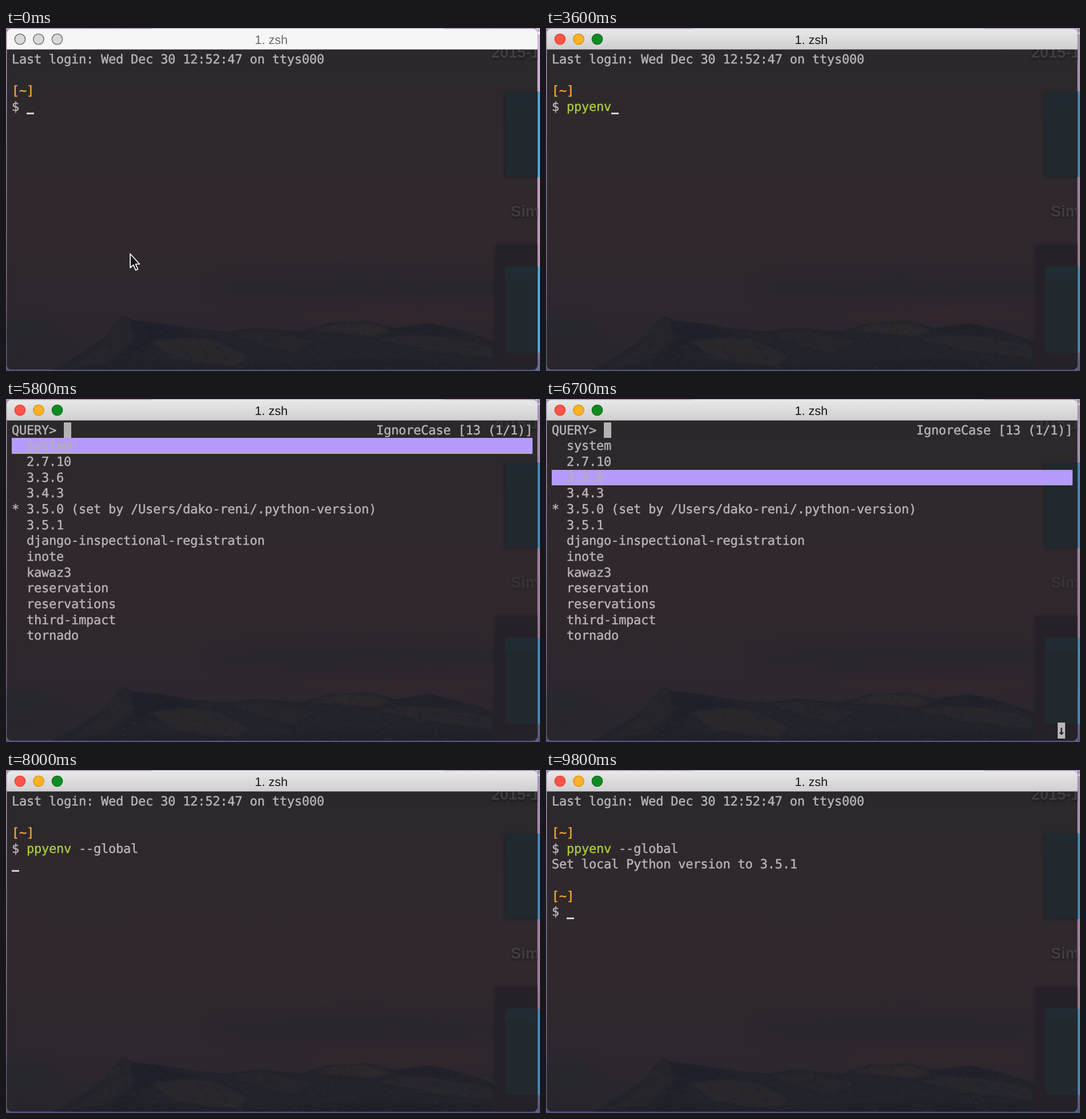
Animation, 933 px wide and 600 px high, one loop 9900 ms. Source, as an HTML page:

```html
<!DOCTYPE html>
<html lang="en">
<head>
<meta charset="utf-8">
<title>zsh</title>
<style>
html, body { margin: 0; width: 100%; height: 100%; overflow: hidden; background: #8f7a9c; }
svg { display: block; width: 933px; height: 600px; }
filter { color-interpolation-filters: sRGB; }
.term text {
  font: 22px "DejaVu Sans Mono", monospace; letter-spacing: -.245px;
  white-space: pre; stroke-width: .45px; text-rendering: geometricPrecision;
}
.title { font: 21.5px "Liberation Sans", Arial, sans-serif; text-anchor: middle; text-rendering: geometricPrecision; }
.label { font: bold 27px "Liberation Sans", Arial, sans-serif; fill: #403c41; }
.label .shadow { fill: #1b181d; }
</style>
</head>
<body>
<svg id="stage" viewBox="0 0 933 600">
  <defs>
    <linearGradient id="desk" x2="0" y2="1">
      <stop offset="0" stop-color="#cfb9dc"/><stop offset=".3" stop-color="#c9a4c8"/>
      <stop offset=".7" stop-color="#bd94b4"/><stop offset=".93" stop-color="#8b7396"/>
      <stop offset="1" stop-color="#5d6b96"/>
    </linearGradient>
    <linearGradient id="edge" x2="0" y2="1">
      <stop offset="0" stop-color="#a893b8"/><stop offset=".7" stop-color="#866d8c"/>
      <stop offset="1" stop-color="#56577f"/>
    </linearGradient>
    <linearGradient id="sky" x2="0" y2="1">
      <stop offset="0" stop-color="#2b282c"/><stop offset=".25" stop-color="#2f282c"/>
      <stop offset=".6" stop-color="#30282e"/><stop offset=".72" stop-color="#2d272e"/>
      <stop offset=".82" stop-color="#2e272f"/><stop offset="1" stop-color="#29252c"/>
    </linearGradient>
    <linearGradient id="bar" x2="0" y2="1">
      <stop offset="0" stop-color="#e9e9e9"/><stop offset="1" stop-color="#cfcfcf"/>
    </linearGradient>
    <filter id="soft" x="-30%" y="-100%" width="160%" height="300%"><feGaussianBlur stdDeviation="10"/></filter>
    <filter id="shade" x="-20%" y="-40%" width="140%" height="180%"><feGaussianBlur stdDeviation="2"/></filter>
    <clipPath id="win"><rect x="1.5" y="1.5" width="927" height="596" rx="8"/></clipPath>
    <clipPath id="ridge"><path id="ridgeShape"/></clipPath>
  </defs>

  <rect width="933" height="600" fill="url(#edge)"/>
  <rect x="926" width="7" height="600" fill="url(#desk)"/>
  <rect x="926" y="111" width="7" height="150" fill="#4fa9dc"/>
  <rect x="926" y="418" width="7" height="150" fill="#4fa9dc"/>
  <rect x="929" y="7" width="4" height="4" fill="#f4f0f6"/>
  <rect id="dim" x="928" width="5" height="600" fill="#201a30" opacity=".22"/>

  <g clip-path="url(#win)">
    <rect y="37" width="933" height="563" fill="url(#sky)"/>
    <g filter="url(#soft)">
      <ellipse cx="20" cy="532" rx="65" ry="17" fill="#25282d"/>
      <ellipse cx="620" cy="455" rx="250" ry="22" fill="#2b262e"/>
      <ellipse cx="690" cy="502" rx="190" ry="13" fill="#33272e"/>
    </g>
    <g id="hills"></g>
    <g filter="url(#shade)">
      <rect x="870" y="112" width="70" height="150" rx="5" fill="#1d1d22" opacity=".6"/>
      <rect x="853" y="378" width="90" height="232" rx="7" fill="#262128"/>
    </g>
    <rect x="872" y="111" width="70" height="149" rx="4" fill="#21282e"/>
    <rect x="872" y="111" width="70" height="21" rx="4" fill="#20292f"/>
    <rect x="872" y="417" width="70" height="151" rx="6" fill="#21292f"/>
    <rect x="872" y="417" width="70" height="24" rx="6" fill="#212b32"/>
    <g id="labels" class="label">
      <text class="shadow" x="848" y="54" filter="url(#shade)">2015-1</text>
      <text x="848" y="52">2015-1</text>
      <text class="shadow" x="882" y="332" filter="url(#shade)">Sim</text>
      <text x="882" y="330">Sim</text>
    </g>
    <rect id="barBox" y="1" width="933" height="36.5"/>
    <g id="lights"></g>
    <text id="title" class="title" x="463.5" y="27.5">1. zsh</text>
    <g id="screen" class="term"></g>
  </g>
  <path id="pointer" d="M217 395V419.5L222.6 414.4 226.6 423.6 230.4 422 226.4 413H233.4Z"
        fill="#18151a" stroke="#fff" stroke-width="1.7" stroke-linejoin="round"/>
</svg>
<script>
const LOOP = 9900, STEP = 100;
const LEFT = 10, TOP = 40.6, CW = 13, RH = 27.66;
const GREY = '#b8b5b7', ORANGE = '#f7a63c', GREEN = '#aacb3a', PALE = '#d3d1d2';
const COMMAND = 'ppyenv', FLAG = ' --global';
const FOCUS = 2200, TYPE = 2800, TYPE_GAP = 130, FLAG_AT = 3800, FLAG_GAP = 120;
const ENTER = 5100, LIST = 5500, PICK = 7800, DONE = 8700;
const MOVES = [6400, 6700, 6900, 7100, 7300];
const VERSIONS = [
  '  system', '  2.7.10', '  3.3.6', '  3.4.3',
  '* 3.5.0 (set by /Users/dako-reni/.python-version)', '  3.5.1',
  '  django-inspectional-registration', '  inote', '  kawaz3',
  '  reservation', '  reservations', '  third-impact', '  tornado'
];

const $ = id => document.getElementById(id);

function add(parent, tag, attrs, text) {
  const el = document.createElementNS('http://www.w3.org/2000/svg', tag);
  for (const k in attrs) el.setAttribute(k, attrs[k]);
  if (text) el.textContent = text;
  parent.appendChild(el);
  return el;
}

function drawHills() {
  let seed = 11;
  const rnd = () => (seed = seed * 16807 % 2147483647) / 2147483647;
  const crest = [[80, 598], [130, 570], [172, 541], [193, 513], [205, 503], [222, 511],
    [275, 517], [330, 526], [385, 531], [440, 524], [515, 531], [565, 516], [635, 513],
    [680, 525], [740, 516], [800, 530], [852, 548], [933, 560]];
  const d = 'M' + crest.map(p => p.join(' ')).join('L') + 'V600H80Z';
  $('ridgeShape').setAttribute('d', d);
  const hills = $('hills');
  add(hills, 'path', { d, fill: '#22232b' });
  const g = add(hills, 'g', { 'clip-path': 'url(#ridge)' });
  const patches = add(g, 'g', { filter: 'url(#shade)', opacity: .75 });
  [
    ['M192 512L205 505 240 522 222 545 170 590 105 598 160 560Z', '#29272d'],
    ['M255 548Q300 532 370 548L425 575 400 592 290 578Z', '#2d2a2d'],
    ['M390 533L450 528 540 548 500 570 440 552Z', '#29272c'],
    ['M530 530L575 517 640 516 675 530 640 540 590 534Z', '#302b2e'],
    ['M650 545Q730 525 850 558L850 578 730 562Z', '#2b292d'],
    ['M215 512L275 519 340 540 260 546 205 590 190 585 225 548Z', '#1f212a'],
    ['M80 600L200 582 420 592 640 580 850 588V600Z', '#202129'],
    ['M660 528L740 518 800 532 760 540Z', '#20212a']
  ].forEach(([path, fill]) => add(patches, 'path', { d: path, fill }));
  // ragged tree and rock texture
  for (const [fill, n] of [['#1c1f28', 900], ['#302d30', 450]]) {
    let marks = '';
    for (let i = 0; i < n; i++) {
      const x = 100 + rnd() * 755, y = 512 + rnd() * 85, w = 2 + rnd() * 6, h = rnd() * 2.5;
      marks += `M${x.toFixed(1)} ${y.toFixed(1)}l${w.toFixed(1)} ${h.toFixed(1)}l${(-w * .4).toFixed(1)} 1.2z`;
    }
    add(g, 'path', { d: marks, fill, opacity: .75 });
  }
}

const lights = [['#ff5449', '#dd4037'], ['#fdb125', '#d99114'], ['#128a22', '#0d701a']].map(
  ([fill, stroke], i) => ({ fill, stroke,
    el: add($('lights'), 'circle', { cx: 24.5 + i * 32.5, cy: 19.5, r: 9.2, 'stroke-width': 1.3 }) }));

const screen = $('screen');
const colX = c => LEFT + c * CW;
const rowY = r => TOP + r * RH;
const rowTop = r => Math.round(rowY(r));

const write = (row, col, text, fill = GREY) =>
  add(screen, 'text', { x: colX(col), y: rowY(row) + 21, fill, stroke: fill }, text);

const box = (row, col, cols, fill) => add(screen, 'rect', {
  x: colX(col), y: rowTop(row), width: cols * CW, height: rowTop(row + 1) - rowTop(row), fill });

const caret = (row, col) =>
  add(screen, 'rect', { x: colX(col), y: rowTop(row) + 24, width: CW, height: 3, fill: PALE });

function prompt(row) {
  write(row, 0, '[~]', ORANGE);
  write(row + 1, 0, '$');
}

const typed = (t, start, gap, text) =>
  text.slice(0, Math.max(0, Math.floor((t - start) / gap) + 1));

function drawShell(t) {
  write(0, 0, 'Last login: Wed Dec 30 12:52:47 on ttys000');
  prompt(2);
  const cmd = typed(t, TYPE, TYPE_GAP, COMMAND);
  const flag = typed(t, FLAG_AT, FLAG_GAP, FLAG);
  if (cmd) write(3, 2, cmd, GREEN);
  if (flag.length > 1) write(3, 9, flag.slice(1));
  if (t < ENTER) caret(3, 2 + cmd.length + flag.length);
  else if (t < DONE) caret(4, 0);
  else {
    write(4, 0, 'Set local Python version to 3.5.1');
    prompt(6);
    caret(7, 2);
  }
}

function drawList(t) {
  const sel = MOVES.filter(m => t >= m).length;
  write(0, 0, 'QUERY>');
  box(0, 7, 1, '#b5b2b4');
  write(0, 49, 'IgnoreCase [13 (1/1)]');
  box(sel + 1, 0, 70, '#b59bff');
  add(screen, 'rect', { x: colX(0), y: rowTop(sel + 1) + 25, width: 70 * CW, height: 1, fill: '#b0a9b8' });
  VERSIONS.forEach((v, i) => write(i + 1, 0, v, i === sel ? '#b3b0b2' : GREY));
  if (MOVES.includes(t)) {
    box(19, 68, 1, '#b9b6b8');
    write(19, 68, '↓', '#222');
  }
}

function render(ms) {
  const t = Math.floor(ms % LOOP / STEP) * STEP;
  const active = t >= FOCUS, listing = t >= LIST && t < PICK;
  $('barBox').setAttribute('fill', active ? 'url(#bar)' : '#f6f6f6');
  $('title').setAttribute('fill', active ? '#161616' : '#6c6c6c');
  $('dim').setAttribute('visibility', active ? 'visible' : 'hidden');
  $('pointer').setAttribute('visibility', t < TYPE ? 'visible' : 'hidden');
  $('labels').setAttribute('opacity', listing ? .55 : 1);
  for (const l of lights) {
    l.el.setAttribute('fill', active ? l.fill : '#d9d9d9');
    l.el.setAttribute('stroke', active ? l.stroke : '#646464');
  }
  screen.replaceChildren();
  (listing ? drawList : drawShell)(t);
}

drawHills();
const start = performance.now();
let last = -1;
function tick() {
  const now = performance.now() - start, step = Math.floor(now / STEP);
  if (step !== last) render(now);
  last = step;
  requestAnimationFrame(tick);
}
tick();
</script>
</body>
</html>
```
